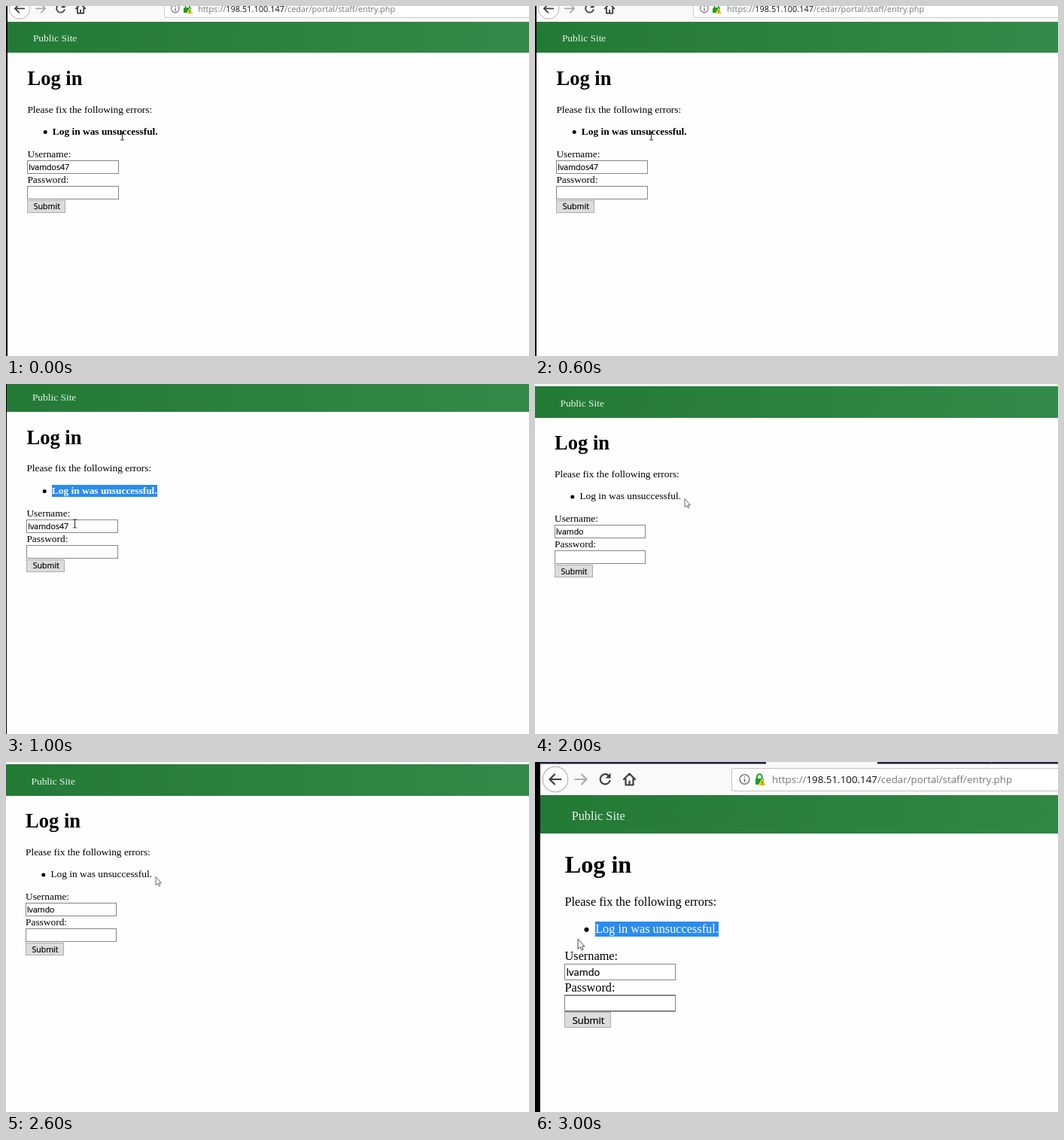
An HTML page that plays this animation: 695x465 px, repeating every 4000 ms.

```html
<!DOCTYPE html>
<html lang="en">
<head>
<meta charset="utf-8">
<title>Log in</title>
<style>
  html, body { margin: 0; width: 100%; height: 100%; overflow: hidden; background: #fff; }
  svg { display: block; width: 695px; height: 465px; }
  rect { shape-rendering: crispEdges; }
  .serif { font: 13.4px "Liberation Serif", "Times New Roman", serif; fill: #000; }
  .title { font-size: 26.5px; font-weight: bold; }
  .sans { font: 10.6px "Open Sans", "Noto Sans", sans-serif; fill: #000; stroke: #000; stroke-width: .2; }
  .url { font: 13.33px "Open Sans", "Noto Sans", sans-serif; fill: #777; }
  .field { fill: #fff; stroke: #858585; }
  .icon { fill: none; stroke: #3c3c40; stroke-width: 2.2; stroke-linecap: round; stroke-linejoin: round; }
</style>
</head>
<body>
<svg viewBox="0 0 695 465">
  <defs>
    <linearGradient id="green">
      <stop offset="0" stop-color="#237a35"/>
      <stop offset="1" stop-color="#348a48"/>
    </linearGradient>
  </defs>

  <g id="page">
    <rect x="-20" y="-30" width="760" height="560" fill="#fefefe"/>

    <!-- browser bar, drawn at the zoomed size -->
    <g transform="scale(.82237) translate(-5 -18.9)">
      <rect x="0" y="-10" width="900" height="54" fill="#f9f9fa"/>
      <path d="M0-10H307V2.5H0zM455-10H900V2.5H455z" fill="#211d3d"/>
      <path d="M606-10V2.5" stroke="#5a5772"/>
      <circle cx="27" cy="23" r="16.7" fill="#fdfdfd" stroke="#a9a9ac"/>
      <path class="icon" d="M34.5 23H20M26 16.5L19.5 23L26 29.5"/>
      <path class="icon" style="stroke:#aaa" d="M53.5 23H68M62 16.5L68.5 23L62 29.5"/>
      <path class="icon" d="M98 18.2A6.6 6.6 0 1 0 99.5 25"/>
      <path d="M100.5 14.5V21.5H93.5z" fill="#3c3c40"/>
      <path class="icon" d="M118 23L125.5 15.5L133 23M120.5 22.5V30.5H130.5V22.5M125.5 30V25.5"/>
      <rect x="261.5" y="9" width="600" height="29" rx="2" fill="#fff" stroke="#c4c4c6"/>
      <circle cx="278.5" cy="23" r="6.4" fill="none" stroke="#66666a" stroke-width="1.3"/>
      <path d="M278.5 19.2V20.8M278.5 22.2V26.8" stroke="#66666a" stroke-width="1.6"/>
      <path d="M295 22V19.5A3.3 3.3 0 0 1 301.6 19.5V22" fill="none" stroke="#1ba11d" stroke-width="2"/>
      <rect x="292.5" y="21.5" width="11.5" height="8.5" rx="1" fill="#1ba11d"/>
      <path d="M302 22.5L307.5 31.5H296.5z" fill="#f5c614" stroke="#fff" stroke-width=".7"/>
      <path d="M302 25.3V28.3M302 29.3V30.5" stroke="#5b4a00" stroke-width="1.1"/>
      <text class="url" x="315" y="28.4">https://<tspan fill="#111">198.51.100.147</tspan>/cedar/portal/staff/entry.php</text>
    </g>

    <rect x="0" y="20.6" width="700" height="41.7" fill="url(#green)"/>
    <rect x="-20" y="-30" width="21.6" height="560" fill="#000"/>

    <g class="serif">
      <text x="35.9" y="47.4" fill="#e9f3ea">Public Site</text>
      <text class="title" x="28.5" y="105">Log in</text>
      <text x="28.4" y="141.7">Please fix the following errors:</text>
      <circle cx="52.2" cy="167.6" r="2.5"/>
      <rect id="mark" x="61.8" y="159.2" height="16" fill="#2a8cee"/>
      <text id="error" x="61.8" y="171.2">Log in was unsuccessful.</text>
      <text x="28.4" y="200.9">Username:</text>
      <text x="28.4" y="234.9">Password:</text>
    </g>

    <rect class="field" x="28.5" y="205.2" width="120.6" height="17.2"/>
    <rect class="field" x="28.5" y="239.4" width="120.6" height="17.2"/>
    <rect x="28.5" y="258.2" width="50.2" height="16" fill="#dcdcdc" stroke="#adadad"/>
    <g class="sans">
      <text id="user" x="30.3" y="217.8"></text>
      <text x="36.8" y="270.4">Submit</text>
    </g>
  </g>

  <path id="beam" d="M-2.5-5.5H-.8L0-5L.8-5.5H2.5M0-5V5M-2.5 5.5H-.8L0 5L.8 5.5H2.5" fill="none" stroke="#333" stroke-width="1.1"/>
  <path id="arrow" d="M0 0V11L2.5 8.8L4.2 12.4L5.9 11.6L4.3 8.2H7.4z" fill="#fff" stroke="#444" stroke-width=".8"/>
</svg>

<script>
const STEP = 1000;
const scenes = [
  { x: 0, y: 0, zoom: 1, user: "lvamdos47", bold: true, mark: 0, beam: [154.5, 172.5] },
  { x: -1, y: -25.2, zoom: 1, user: "lvamdos47", bold: true, mark: 140, beam: [91.5, 185.5] },
  { x: -2.4, y: -17.7, zoom: 1, user: "lvamdo", bold: false, mark: 0, arrow: [199, 152.5] },
  { x: 5, y: 18.9, zoom: 1.216, user: "lvamdo", bold: false, mark: 134.5, arrow: [57, 235] }
];
const el = id => document.getElementById(id);

function place(node, at, zoom) {
  node.style.display = at ? "" : "none";
  if (at) node.setAttribute("transform", `translate(${at}) scale(${zoom})`);
}

function show(s) {
  place(el("page"), [s.x, s.y], s.zoom);
  place(el("beam"), s.beam, s.zoom);
  place(el("arrow"), s.arrow, s.zoom);
  el("user").textContent = s.user;
  el("mark").setAttribute("width", s.mark);
  el("error").style.fontWeight = s.bold ? "bold" : "normal";
  el("error").style.fill = s.mark ? "#fff" : "";
}

let current = -1;
function tick() {
  const next = Math.floor(performance.now() / STEP) % scenes.length;
  if (next !== current) show(scenes[current = next]);
  requestAnimationFrame(tick);
}
tick();
</script>
</body>
</html>
```
